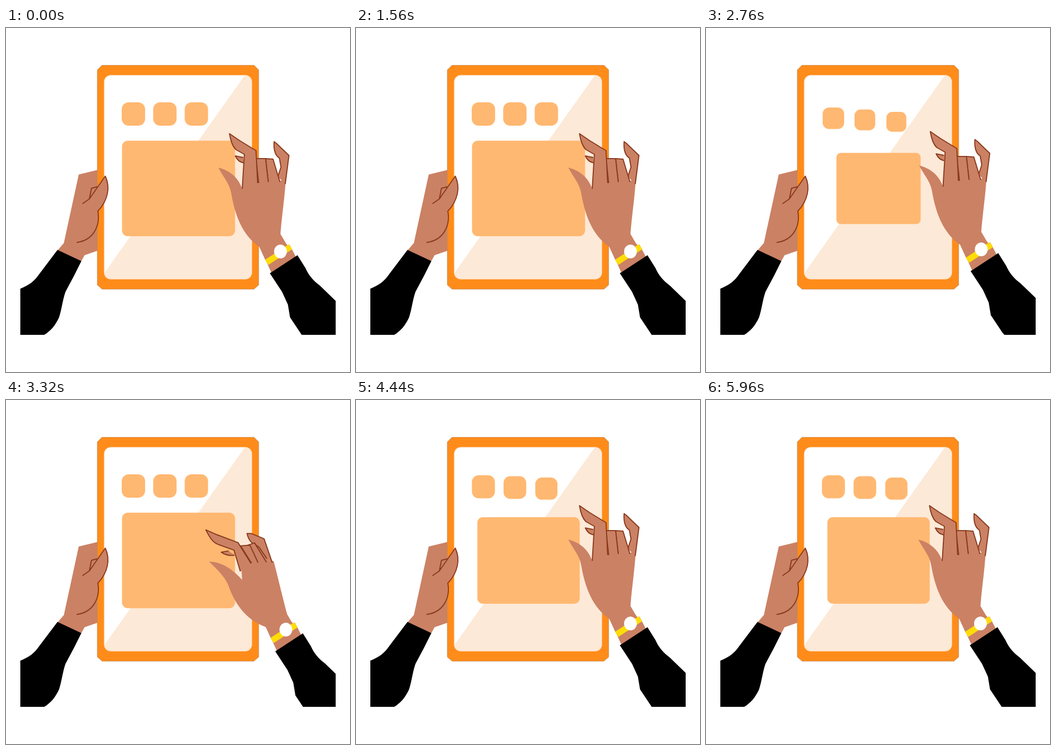
An HTML page with a canvas that plays this animation: 648 px wide and 648 px high, repeating every 6.04 s.

```html
<!DOCTYPE html>
<html>
<head>
<meta charset="utf-8">
<style>
html, body { margin: 0; width: 100%; height: 100%; overflow: hidden; background: #fff; }
canvas { display: block; }
</style>
</head>
<body>
<canvas id="stage" width="648" height="648"></canvas>
<script>
const ctx = document.getElementById('stage').getContext('2d');
const SKIN = '#cb8164', LINE = '#8a3a1e', ORANGE = '#ff8c1a', CARD = '#ffb871';
const LOOP = 6040, CYCLE = 1520, STEP = 40;

// Right hand parts: [relaxed path, pointing path, outlined]
const HAND = [
  ['M447 244 L432 241 Q437 252 447 254', 'M390 327 L377 336 Q396 341 414 333', true],
  ['M400 263 C420 268 437 280 445 303 L449 250 L472 245 L503 247 L516 288 L527 285 C525 320 520 350 517 388 L527 405 L537 418 L499 443 L488 436 L477 412 C445 390 431 352 424 310 C421 293 410 282 400 263Z',
   'M365 348 C385 342 410 352 448 377 L437 337 L446 317 L463 316 L475 316 L480 322 C500 352 520 381 545 418 L550 427 L560 440 L522 465 L511 458 L505 443 C465 440 435 425 415 390 C403 372 385 357 365 348Z', false],
  ['M526 294 L533 240 L509 217 L505 214 C504 228 507 240 515 245 L518 262 L512 280',
   'M475 317 L433 283 L410 289 L396 292 C402 296 408 299 414 298 L430 291 L470 317', true],
  ['M516 290 L503 247 L489 246 L494 290', 'M463 320 L430 291 L411 304 L450 321', true],
  ['M494 290 L489 246 L471 246 L476 292', 'M455 321 L428 302 L411 304 L450 321', true],
  ['M474 292 L471 231 L440 212 L421 199 C423 212 426 222 433 229 L449 238 L445 303',
   'M450 321 L400 309 L350 298 L327 293 C340 309 350 321 369 320 L410 332 L441 341', true]
];
const WRIST = [517, 421], POINT_SHIFT = [23, 22];

// time, arm x, arm y, hand bend in degrees, pointing amount
const KEYS = [
  [40, 0, 0, 0, 0],
  [560, 23, 26, -2, 1],
  [680, 23, 22, 0, 1],
  [760, 26, -39, 17, 1],
  [860, 24, -62, 24, 1],
  [1240, 1.5, -4, 0, 0],
  [1400, 0, 0, 0, 0],
  [1520, 0, 0, 0, 0]
];

// Monotone cubic interpolation of one key column
function track(t, col) {
  const slope = i => KEYS[i] && KEYS[i + 1]
    ? (KEYS[i + 1][col] - KEYS[i][col]) / (KEYS[i + 1][0] - KEYS[i][0]) : 0;
  const tangent = i => {
    const a = slope(i - 1), b = slope(i);
    return a * b <= 0 ? 0 : 2 * a * b / (a + b);
  };
  if (t <= KEYS[0][0]) return KEYS[0][col];
  let i = 0;
  while (i < KEYS.length - 2 && t > KEYS[i + 1][0]) i++;
  const [k, n] = [KEYS[i], KEYS[i + 1]];
  const h = n[0] - k[0], u = (t - k[0]) / h, v = 1 - u;
  return k[col] * (1 + 2 * u) * v * v + tangent(i) * h * u * v * v
    + n[col] * u * u * (3 - 2 * u) - tangent(i + 1) * h * u * u * v;
}

// Blends two paths, then bends them at the wrist; points close to it turn less
function pose(from, to, amount, bend) {
  const goal = to.match(/\d+/g);
  let i = 0;
  return from.replace(/(\d+) (\d+)/g, (_, ...xy) => {
    const [x, y] = [0, 1].map(k =>
      +xy[k] + (goal[i++] - POINT_SHIFT[k] - xy[k]) * amount - WRIST[k]);
    const angle = bend * Math.PI / 180 * Math.min(1, Math.hypot(x, y) / 130);
    const c = Math.cos(angle), s = Math.sin(angle);
    return (WRIST[0] + x * c - y * s).toFixed(2) + ' ' + (WRIST[1] + x * s + y * c).toFixed(2);
  });
}

function shape(d, fill, stroke, width = 2) {
  const path = new Path2D(d);
  if (fill) { ctx.fillStyle = fill; ctx.fill(path); }
  if (stroke) { ctx.strokeStyle = stroke; ctx.lineWidth = width; ctx.stroke(path); }
}

function box(x, y, w, h, r, fill) {
  ctx.beginPath();
  ctx.roundRect(x, y, w, h, r);
  ctx.fillStyle = fill;
  ctx.fill();
}

function tablet() {
  shape('M181 70 H467 L476 79 V484 L467 492 H181 L172 484 V79Z', ORANGE, '#b98a5c', 0.8);
  box(184.5, 88.5, 279, 385, 13, '#ffd9b3');
  box(185.5, 89.5, 277, 383, 12, '#fff');
  ctx.save();
  ctx.clip();
  shape('M450 89 H464 V474 H185 V462Z', '#fde9d7');
  ctx.restore();
}

// Cards slide up and fade, then grow back in
function card(t, i) {
  const big = i === 3;
  const w = big ? 213 : 44, h = big ? 180 : 44;
  const cx = big ? 325 : 240 + 59.3 * i;
  let cy = big ? 302.3 : 162, scale = 1, alpha = 1;
  const e = t - [380, 455, 525, 595][i];
  if (e > 0 && e < 560) {
    cy -= (0.0149 * e) ** 2;
    alpha = 1 - 0.4 * (e / 560) ** 2 - 0.6 * (e / 560) ** 8;
  } else if (e >= 560) {
    alpha = Math.min(1, (e - 520) / 120);
    if (big) scale = 1 - 0.255 * ((CYCLE - t) / 280) ** 1.17;
    else {
      const rise = (0.0101 * (CYCLE + 50 * i - t)) ** 2;
      cy += rise;
      scale = 1 - rise / 100;
    }
  }
  ctx.globalAlpha = alpha;
  box(cx - w * scale / 2, cy - h * scale / 2, w * scale, h * scale, (big ? 11 : 13) * scale, CARD);
  ctx.globalAlpha = 1;
}

function leftArm() {
  shape('M172 300 L187 279 C197 300 192 325 173 345 C178 372 165 400 134 404 L144 331Z', SKIN);
  shape('M144 331 L157 322 L187 279 C197 300 192 325 173 345 C178 372 165 400 133 404 M157 322 L161 302 L172 299', null, LINE);
  shape('M97 418 L142 439 L128 467 L112 497 C106 515 105 530 100 545 C93 560 85 570 72 578 H27 V491 C45 484 55 475 63 463Z', '#000');
}

function rightArm(t) {
  const bend = track(t, 3), pointing = track(t, 4);
  ctx.save();
  ctx.translate(track(t, 1), track(t, 2));
  for (const [rest, point, outlined] of HAND)
    shape(pose(rest, point, pointing, bend), SKIN, outlined && LINE);
  shape('M489 437 L534 408 L546 431 L500 461Z', SKIN);
  shape('M497 462 L549 428 L564 452 C570 466 580 477 591 485 L621 514 L700 590 V640 H612 L557 578 L535 545 L531 521 L520 497Z', '#000');
  shape('M491 441.5 L536 412', null, '#ffdc08', 11.5);
  ctx.beginPath();
  ctx.ellipse(...WRIST, 12, 13, 0, 0, 7);
  ctx.fillStyle = '#fff';
  ctx.fill();
  ctx.restore();
}

function draw(now) {
  const t = Math.floor(now % LOOP / STEP) * STEP % CYCLE;
  ctx.fillStyle = '#fff';
  ctx.fillRect(0, 0, 648, 648);
  ctx.lineJoin = 'round';
  ctx.save();
  ctx.beginPath();
  ctx.rect(27, 69.5, 594, 508.5);
  ctx.clip();
  shape('M137 276 L174 267 V419 L148 428 L142 439 L97 419 L109 405Z', SKIN);
  tablet();
  for (let i = 0; i < 4; i++) card(t, i);
  leftArm();
  rightArm(t);
  ctx.restore();
}

const start = performance.now();
function tick() {
  draw(performance.now() - start);
  requestAnimationFrame(tick);
}
tick();
</script>
</body>
</html>
```
